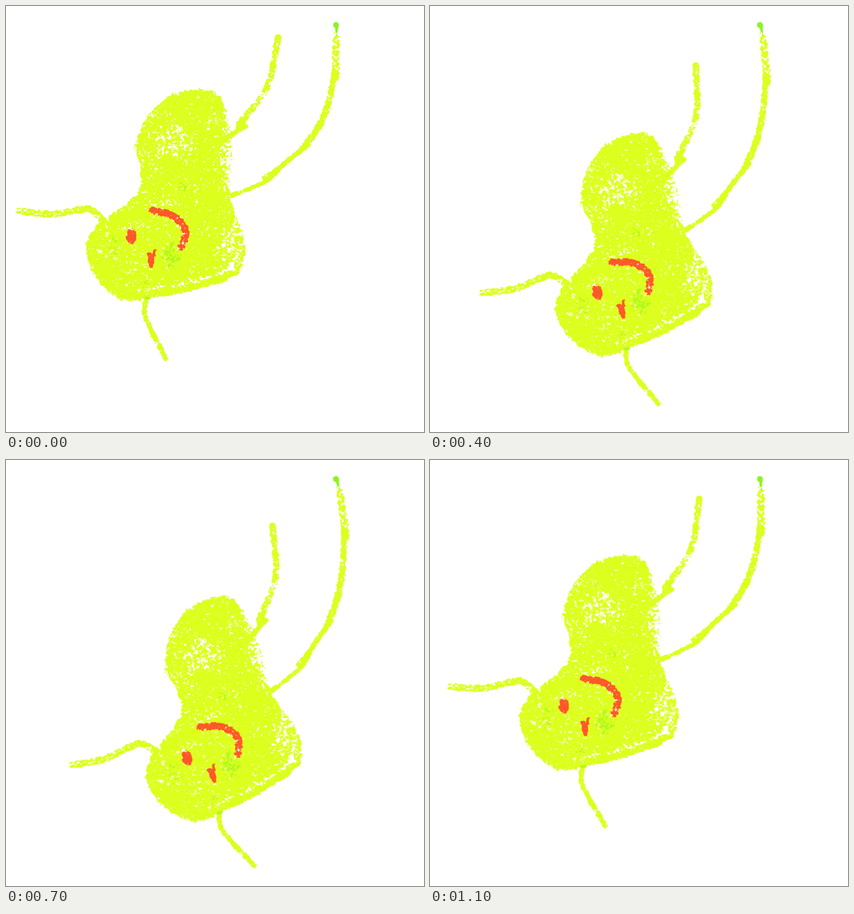
These frames come from a looping animation (742x755 px, 1.2 s). An HTML page with a canvas:

```html
<!DOCTYPE html>
<html>
<head>
<meta charset="utf-8">
<style>
html, body { margin: 0; width: 100%; height: 100%; overflow: hidden; background: #fff }
canvas { display: block }
</style>
</head>
<body>
<canvas id="stage" width="742" height="755"></canvas>
<script>
const W = 742, H = 755;
const stage = document.getElementById('stage').getContext('2d');
const clamp = v => Math.min(1, Math.max(0, v));

// Seeded value noise, 0..1, with lattice cells of the given size
function hash(x, y) {
  let h = Math.imul(x, 374761393) + Math.imul(y, 668265263);
  h = Math.imul(h ^ (h >>> 13), 1274126177);
  return ((h ^ (h >>> 16)) >>> 0) / 4294967295;
}
function noise(x, y, size) {
  x /= size; y /= size;
  const i = Math.floor(x), j = Math.floor(y), u = x - i, v = y - j;
  const top = hash(i, j) * (1 - u) + hash(i + 1, j) * u;
  const low = hash(i, j + 1) * (1 - u) + hash(i + 1, j + 1) * u;
  return top * (1 - v) + low * v;
}

// The alpha that paint() leaves is crayon pressure; paper grain turns it into specks
function crayon([r, g, b], paint) {
  const c = document.createElement('canvas');
  c.width = W; c.height = H;
  const ctx = c.getContext('2d', { willReadFrequently: true });
  ctx.lineCap = ctx.lineJoin = 'round';
  paint(ctx);
  const img = ctx.getImageData(0, 0, W, H), d = img.data;
  for (let i = 0; i < d.length; i += 4) {
    if (!d[i + 3]) continue;
    const x = (i / 4) % W, y = Math.floor(i / 4 / W);
    const grain = 0.6 * noise(x, y, 3.2) + 0.4 * noise(x + 900, y, 1.8)
      + 0.18 * (noise(x, y + 900, 24) - 0.5);
    d[i] = r; d[i + 1] = g; d[i + 2] = b;
    d[i + 3] = 255 * clamp((d[i + 3] / 255 - grain) * 6);
  }
  ctx.putImageData(img, 0, 0);
  return c;
}

// Catmull-Rom spline through the key points
function curve(pts, closed) {
  const path = new Path2D(), n = pts.length;
  const at = i => pts[closed ? (i + n) % n : Math.min(n - 1, Math.max(0, i))];
  path.moveTo(...pts[0]);
  for (let i = 0; i < (closed ? n : n - 1); i++) {
    const [a, b, c, d] = [at(i - 1), at(i), at(i + 1), at(i + 2)];
    path.bezierCurveTo(b[0] + (c[0] - a[0]) / 6, b[1] + (c[1] - a[1]) / 6,
      c[0] - (d[0] - b[0]) / 6, c[1] - (d[1] - b[1]) / 6, ...c);
  }
  return path;
}
function stroke(ctx, width, pressure, ...pts) {
  ctx.filter = 'blur(1.5px)';
  ctx.lineWidth = width;
  ctx.strokeStyle = `rgba(0,0,0,${pressure})`;
  ctx.stroke(curve(pts));
}
function spot(ctx, x, y, rx, ry, pressure, blur = 8) {
  ctx.filter = `blur(${blur}px)`;
  ctx.fillStyle = `rgba(0,0,0,${pressure})`;
  ctx.beginPath();
  ctx.ellipse(x, y, rx, ry, 0, 0, 7);
  ctx.fill();
}

const YELLOW = [220, 255, 30], GREEN = [140, 244, 28], RED = [255, 88, 40];

const body = crayon(YELLOW, ctx => {
  ctx.filter = 'blur(3px)';
  ctx.fillStyle = 'rgba(0,0,0,.83)';
  ctx.fill(curve([[345, 146], [384, 168], [404, 250], [399, 335], [425, 420], [410, 477], [310, 508],
    [205, 521], [150, 465], [150, 400], [235, 325], [230, 240], [275, 168]], true));

  ctx.globalCompositeOperation = 'destination-out';
  spot(ctx, 300, 240, 40, 30, .24);
  spot(ctx, 395, 270, 14, 80, .34);
  spot(ctx, 402, 430, 22, 45, .24);
  stroke(ctx, 5, .3, [235, 503], [320, 492], [405, 464]);

  ctx.globalCompositeOperation = 'source-over';
  stroke(ctx, 8, .6, [200, 515], [310, 506], [410, 472]);
  stroke(ctx, 14, .74, [22, 363], [80, 369], [145, 360], [172, 380]);
  stroke(ctx, 10, .88, [250, 516], [248, 552], [283, 624]);
  stroke(ctx, 13, .76, [483, 55], [464, 142], [412, 212]);
  stroke(ctx, 10, .85, [427, 211], [384, 240]);
});

const arm = crayon(YELLOW, ctx => {
  stroke(ctx, 15, .63, [586, 52], [585, 125]);
  stroke(ctx, 13, .8, [584, 120], [565, 195], [530, 250]);
  stroke(ctx, 10, .9, [530, 250], [480, 292]);
  stroke(ctx, 9, .88, [482, 291], [460, 312], [400, 336]);
  stroke(ctx, 8, .75, [478, 290], [457, 304]);
});

const armTip = crayon(GREEN, ctx => {
  spot(ctx, 586, 34, 4.5, 6, 1, 1);
  stroke(ctx, 5, .75, [586, 38], [587, 52]);
});

const shade = crayon(GREEN, ctx => {
  spot(ctx, 293, 442, 20, 28, .58);
  spot(ctx, 325, 322, 30, 12, .54);
  spot(ctx, 190, 430, 18, 28, .5);
  spot(ctx, 255, 490, 18, 12, .54);
  spot(ctx, 251, 517, 6, 4, .85, 1.5);
});

const face = crayon(RED, ctx => {
  spot(ctx, 222, 408, 9.5, 15, .92, 1.5);
  stroke(ctx, 9, .9, [254, 440], [257, 459]);
  stroke(ctx, 6, .9, [264, 434], [258, 461]);
  stroke(ctx, 14, .87, [260, 362], [298, 373], [319, 400], [311, 427]);
});

// The figure swings rigidly while the long arm's tip stays pinned
const TIP = { x: 586, y: 34 }, CENTRE = [261.25, 350.75];

function draw(p) {
  const pose = new DOMMatrix()
    .translate(CENTRE[0] + 65 * p + 39 * p * p, CENTRE[1] + 156 * p - 27 * p * p)
    .rotate(-19.5 * p)
    .translate(-CENTRE[0], -CENTRE[1]);
  const pin = pose.inverse().transformPoint(TIP);
  const dx = pin.x - TIP.x, dy = pin.y - TIP.y;

  stage.resetTransform();
  stage.fillStyle = '#fff';
  stage.fillRect(0, 0, W, H);
  stage.setTransform(pose);
  stage.drawImage(body, 0, 0);
  stage.globalAlpha = .55;
  stage.drawImage(shade, 0, 0);
  stage.globalAlpha = 1;
  stage.drawImage(face, 0, 0);
  for (let y = 20; y < 345; y++) {
    const t = clamp((250 - y) / 216), pull = t * t * (3 - 2 * t);
    for (const part of [arm, armTip])
      stage.drawImage(part, 390, y, 220, 2, 390 + dx * pull, y + dy * pull, 220, 2);
  }
}

// Six even steps down, six back
let shown = -1;
const start = performance.now();
function tick() {
  const step = Math.floor((performance.now() - start) / 100) % 12;
  if (step !== shown) {
    shown = step;
    draw(1 - Math.abs(step - 6) / 6);
  }
  requestAnimationFrame(tick);
}
tick();
</script>
</body>
</html>
```
